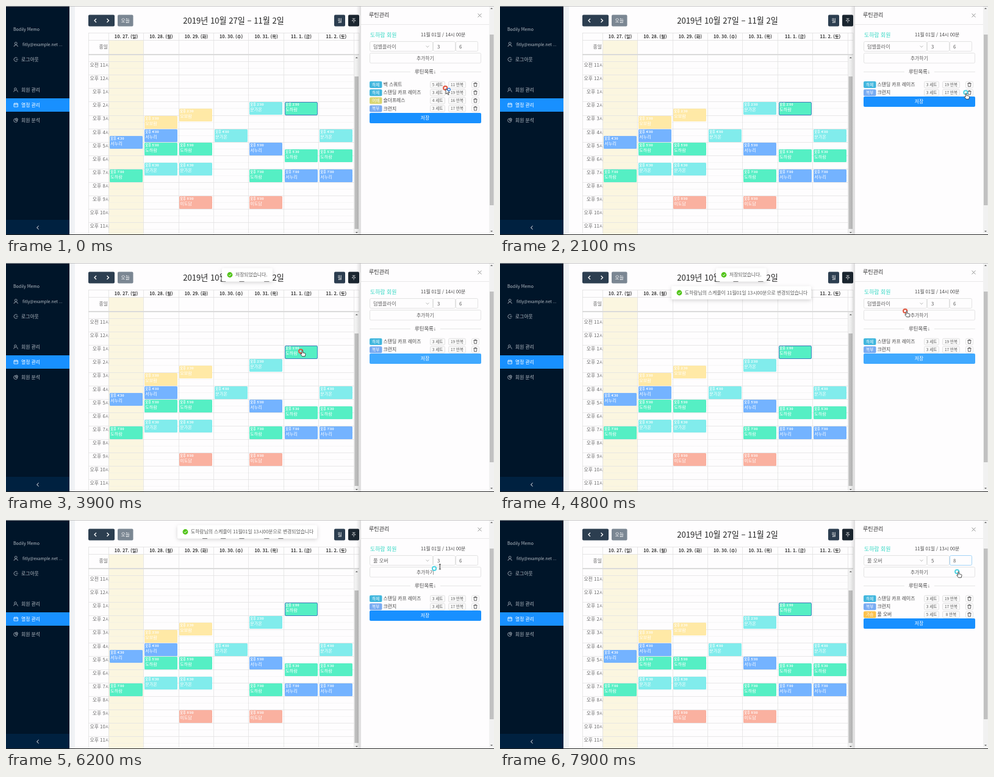
An HTML page for the animation above (8 s loop, 800 by 377 pixels).

```html
<!DOCTYPE html>
<html lang="ko">
<head>
<meta charset="utf-8">
<title>루틴관리</title>
<style>
  html, body { margin: 0; width: 100%; height: 100%; overflow: hidden; background: #fff; }
  svg { display: block; width: 800px; height: 377px; }
  text { font-family: "Noto Sans CJK KR", "Noto Sans CJK", "Noto Sans", sans-serif; white-space: pre; }
  .latin { font-family: "Liberation Sans", sans-serif; }
</style>
</head>
<body>
<svg viewBox="0 0 800 377" xmlns="http://www.w3.org/2000/svg">
  <defs>
    <filter id="soft" x="-20%" y="-40%" width="140%" height="200%">
      <feDropShadow dx="0" dy="2" stdDeviation="3" flood-opacity=".17"/>
    </filter>
    <linearGradient id="edge">
      <stop offset="0" stop-color="#000" stop-opacity="0"/>
      <stop offset="1" stop-color="#000" stop-opacity=".13"/>
    </linearGradient>
  </defs>
  <g id="base"></g><g id="drag"></g><g id="panel"></g><g id="toasts"></g><g id="pointer"></g>
</svg>
<script>
const LOOP = 8000, BODY = 7.84;
const MEMBER = '도하람', GREEN = '#55efc4', BLUE = '#74b3ff', CYAN = '#81ecec', YELLOW = '#ffe9a6', SALMON = '#fab1a0';
const PRIMARY = '#1890ff', HOVER = '#40a9ff', BORDER = '#dcdcdc', INK = '#595959', PAPER = '#fefdfe';

// Drawing helpers; text is placed by its vertical centre.
const rect = (x, y, w, h, fill, more = '') => `<rect x="${x}" y="${y}" width="${w}" height="${h}" fill="${fill}" ${more}/>`;
const box = (x, y, w, h, stroke = BORDER, fill = PAPER, r = 2) =>
  rect(x + .5, y + .5, w - 1, h - 1, fill, `stroke="${stroke}" stroke-width=".8" rx="${r}"`);
const line = (d, stroke, w = 1, more = '') => `<path d="${d}" fill="none" stroke="${stroke}" stroke-width="${w}" ${more}/>`;
const text = (x, y, s, size = BODY, fill = INK, more = '') =>
  `<text x="${x}" y="${y + size * .37}" font-size="${size}" fill="${fill}" ${more}>${s}</text>`;
const mid = 'text-anchor="middle"', bold = 'font-weight="700"';
const tri = (x, y, up, fill = '#606060') => `<path d="M${x - 2} ${y + up}h4l-2 ${-2 * up}z" fill="${fill}"/>`;

const colX = i => 168.3 + i * 57.4;
const hourY = h => 158.4 + (h - 14) * 22.1;

function event(day, hour, name, color, picked) {
  const x = Math.floor(colX(day) + 1.8), y = Math.round(hourY(hour));
  const label = `오후 ${Math.floor(hour) - 12}:${hour % 1 ? '30' : '00'}`;
  const body = picked ? box(x, y, 54, 22, '#2468b8', color, 1.5) : rect(x, y, 54, 21, color, 'rx="1.5"');
  return body + text(x + 1.2, y + 4.4, label, 5.3, '#fff', bold) + text(x + 1.2, y + 12, name, 7.1, '#fff');
}

function sidebar() {
  const soft = '#b4bcc4';
  let s = rect(0, 0, 104, 377, '#001529') + rect(0, 352, 104, 25, '#002140') + rect(0, 152, 104, 22, PRIMARY);
  s += text(12, 38, 'Bodily Memo', 7, soft) + text(27, 63, 'fitly@example.net ...', 6.8, soft);
  s += text(25, 88, '로그아웃', BODY, soft) + text(25, 138, '회원 관리', BODY, soft);
  s += text(25, 163, '열정 관리', BODY, '#fff') + text(25, 188, '회원 분석', BODY, soft);
  s += line('M14.3 61.5a1.9 1.9 0 1 1 3.8 0a1.9 1.9 0 1 1 -3.8 0M13 67q.3-3 3.2-3t3.2 3', soft, .8);
  s += line('M18.6 85.6a3.3 3.3 0 1 0 0 4.8M16 88h4', soft, .8);
  s += line('M13.6 136.6a1.8 1.8 0 1 1 3.6 0a1.8 1.8 0 1 1 -3.6 0M12.6 141.4q.2-2.6 2.6-2.6M16.6 139.2a1.2 1.2 0 1 1 2 1.4l1.2 1', soft, .8);
  s += line('M13 160.5h6.4v5.5h-6.4zM13 162.4h6.4M14.8 159.2v1.6M17.6 159.2v1.6', '#fff', .8);
  s += line('M15.6 185.2a3.1 3.1 0 1 0 3.3 3.3h-3.3zM17 184.5a3 3 0 0 1 2.5 2.6h-2.5z', soft, .8);
  return s + line('M53.6 362l-3 2.9 3 2.9', '#fff', 1);
}

function calendar() {
  const days = ['10. 27. (일)', '10. 28. (월)', '10. 29. (화)', '10. 30. (수)', '10. 31. (목)', '11. 1. (금)', '11. 2. (토)'];
  let s = rect(104, 0, 9, 377, '#f0f2f5') + rect(113, 0, 469, 377, PAPER);
  s += rect(135, 14.5, 43, 19, '#2c3e50', 'rx="2"') + rect(183, 14.5, 25.5, 19, '#7b8793', 'rx="2"');
  s += line('M148 21l-3 3 3 3M165.5 21l3 3-3 3', '#fff', 1.3);
  s += text(195.7, 24, '오늘', BODY, '#fff', mid) + text(373, 24.3, '2019년 10월 27일 – 11월 2일', 13.1, '#222', mid + ' font-weight="500"');
  s += rect(538, 14.5, 18, 19, '#2c3e50', 'rx="2"') + rect(561, 14.5, 18, 19, '#1a252f', 'rx="2"');
  s += text(547, 24, '월', BODY, '#fff', mid) + text(570, 24, '주', BODY, '#fff', mid);
  s += rect(168, 56, 57.5, 320, '#fbf6e0');
  for (let h = 11; h < 24; h++) {
    const y = Math.round(hourY(h)) - .5;
    s += line(`M135 ${y}H571`, '#e3e3e3', .8) + line(`M168 ${y + 11}H571`, '#e8e8e8', .7, 'stroke-dasharray="1 1"');
    s += text(170, hourY(h) + 5, `${h < 12 ? '오전' : '오후'} ${h > 12 ? h - 12 : h}시`, BODY, '#666', 'text-anchor="end"');
  }
  for (let i = 0; i < 8; i++) s += line(`M${Math.floor(colX(i)) + .5} 44V376`, '#e2e2e2', .8);
  s += line('M135 44.5H579V376M135.5 44V376M135 56.5H579', '#e0e0e0', .8);
  days.forEach((d, i) => s += text(colX(i) + 28.7, 50.5, d, 7.3, '#333', mid + ' ' + bold));
  s += text(167, 67.5, '종일', BODY, '#666', 'text-anchor="end"') + rect(135, 79, 444, 2, '#dadada');
  s += rect(571, 81, 8, 295, '#f1f1f1') + rect(571.5, 116, 6.5, 251, '#bdbdbd') + tri(574.8, 85, 1) + tri(574.8, 373, -1);

  const guests = { a: [MEMBER, GREEN], b: ['서누리', BLUE], c: ['문가온', CYAN], d: ['이도담', SALMON], e: ['오보람', YELLOW] };
  const plan = ['b16.5 a19', 'e15 b16 a17 c18.5', 'e14.5 a17 c18.5 d21', 'c16', 'c14 b17 a19 d21', 'a17.5 b19', 'c16 a17.5 b19'];
  plan.forEach((list, day) => list.split(' ').forEach(p => s += event(day, +p.slice(1), ...guests[p[0]])));
  return s;
}

function frame() {
  let s = rect(574, 0, 8, 377, 'url(#edge)') + rect(582, 0, 210, 377, PAPER) + rect(792, 0, 8, 377, '#f1f1f1');
  s += rect(793, 47, 6.5, 281, '#c1c1c1') + tri(796, 4, 1) + tri(796, 371, -1);
  s += text(595, 14.5, '루틴관리', 9.1, '#333') + line('M773.5 12.5l6 6M779.5 12.5l-6 6', '#888', .9);
  s += line('M582 30.5H792', '#e8e8e8') + line('M596 108.5H663M712 108.5H779', '#e4e4e4', .9);
  return s + text(687.5, 108, '루틴목록<tspan class="latin">↓</tspan>', 8.4, '#444', mid);
}

const TAGS = { 하체: '#42b7de', 어깨: '#dad673', 복부: '#78abf2', 가슴: '#fdc24c' };
const ROWS = [
  { tag: '하체', name: '백 스쿼트', sets: 5, reps: 11, from: 0, to: 1050 },
  { tag: '하체', name: '스탠딩 카프 레이즈', sets: 3, reps: 19, from: 0, to: LOOP },
  { tag: '어깨', name: '숄더프레스', sets: 4, reps: 16, from: 0, to: 1700 },
  { tag: '복부', name: '크런지', sets: 3, reps: 17, from: 0, to: LOOP },
  { tag: '가슴', name: '풀 오버', sets: 5, reps: 8, from: 7800, to: LOOP }
];

function routine(r, y) {
  const badge = (x, w, s) => box(x, y - 5.8, w, 11.6, BORDER, '#fafafa') + text(x + w / 2, y, s, 6.5, INK, mid);
  return rect(596, y - 5.5, 20.5, 11, TAGS[r.tag], 'rx="2"') + text(606.2, y, r.tag, 6.5, '#fff', mid) +
    text(618.5, y - .3, r.name, BODY, '#444') + badge(695, 25, r.sets + ' 세트') + badge(725, 29, r.reps + ' 반복') +
    box(763, y - 5.8, 13, 11.6) +
    line(`M766.4 ${y - 2.1}h6.2M768.2 ${y - 2.1}v-1.2h2.6v1.2M767.2 ${y - 2}l.3 5h4l.3-5`, '#444', .8);
}

function menu(hover) {
  const items = ['벤치프레스', '덤벨플라이', '케이블 크로스오버', '풀 오버', '딥스', '팩 덱 플라이', '시티드 체스트 프레스'];
  let s = rect(596, 77, 104, 131, '#fff', 'rx="2" filter="url(#soft)"') + text(601.5, 85, '가슴', 6.7, '#999');
  items.forEach((name, i) => {
    const y = 102 + i * 16.5;
    if (i === hover) s += rect(596, y - 8.2, 95, 16.4, '#eaf6fe');
    s += text(606, y, name, BODY, '#555', i === 1 ? bold : '');
  });
  return s + rect(691, 77, 8.5, 131, '#f1f1f1') + rect(692, 86, 6.5, 17, '#bdbdbd') + tri(695.3, 81, 1) + tri(695.3, 203, -1);
}

const between = (t, a, b) => t >= a && t < b;

function panel(t) {
  const open = between(t, 5000, 5800), sets = t < 6600 ? 3 : 5, reps = t < 7250 ? 6 : 8;
  const first = between(t, 6350, 7100), second = t >= 6900;
  let s = text(597, 47.3, MEMBER + ' 회원', 8.9, '#35d8c4') + text(680, 47, `11월 01일 / ${t < 4950 ? 14 : 13}시 00분`, 7.6, '#444');
  s += box(596, 58, 104, 17, open ? HOVER : BORDER) + text(602, 66.5, t < 5800 ? '덤벨플라이' : '풀 오버', 8.2, '#666');
  s += line(open ? 'M688.5 68l2.5-2.5 2.5 2.5' : 'M688.5 65.5l2.5 2.5 2.5-2.5', '#aaa', .8);
  s += box(700, 58, 37, 17, first ? HOVER : BORDER) + box(737, 58, 37, 17, second ? (t < 7600 ? HOVER : '#8cc9f5') : BORDER);
  s += text(707, 66.7, sets, BODY) + text(743, 66.7, reps, BODY);
  const spin = x => line(`M${x - 1.5} 65l1.5-1.5 1.5 1.5M${x - 1.5} 69l1.5 1.5 1.5-1.5`, '#aaa', .7);
  if (first) s += spin(731);
  if (between(t, 6800, 7600)) s += spin(768);
  if (between(t, 6900, 7500)) s += line('M748.3 62.5v8.5', '#333', .8);
  if (between(t, 6400, 6800)) s += line('M712.3 62.5v8.5', '#333', .8);
  s += box(596, 77, 183, 17.5) + text(687.3, 85.8, '추가하기', BODY, INK, mid);
  const rows = ROWS.filter(r => between(t, r.from, r.to));
  rows.forEach((r, i) => s += routine(r, 129.6 + i * 13.1));
  const y = Math.round(122.8 + rows.length * 13.2);
  s += rect(596, y, 183, 17, between(t, 2350, 5000) ? HOVER : PRIMARY, 'rx="2"') + text(687, y + 8.2, '저장', BODY, '#fff', mid);
  return open ? s + menu(t < 5620 ? 1 : 3) : s;
}

// Each toast slides in, stays about three seconds and leaves upwards.
const clamp = v => Math.max(0, Math.min(1, v));
const out = v => 1 - (1 - clamp(v)) ** 2;
const NOTES = [
  { x: 354, w: 83, from: 2600, to: 5750, s: '저장되었습니다.', y: () => 19.5 },
  { x: 281, w: 229, from: 4250, to: 7400, s: MEMBER + '님의 스케줄이 11월01일 13시00분으로 변경되었습니다', y: t => 49 - 29.5 * out((t - 5800) / 300) }
];
const toast = (n, t) => {
  if (!between(t, n.from, n.to + 300)) return '';
  const p = Math.min(out((t - n.from) / 300), 1 - clamp((t - n.to) / 300)), y = n.y(t) - (1 - p) * 22;
  return `<g opacity="${p}">` + rect(n.x, y - 10.7, n.w, 21.4, '#fff', 'rx="2" filter="url(#soft)"') +
    `<circle cx="${n.x + 13}" cy="${y}" r="4.4" fill="#52c41a"/>` +
    line(`M${n.x + 11} ${y}l1.5 1.7 2.6-3.2`, '#fff', 1) + text(n.x + 22, y, n.s, 7.8, INK) + '</g>';
};

const PATH = [
  [0, 723, 138], [150, 723, 138], [750, 769, 132], [1200, 769, 133.5], [1450, 769, 143], [2000, 768, 144],
  [2400, 746, 160], [2900, 746, 160], [3400, 486, 168], [3550, 486, 168], [3950, 486, 146], [4200, 486, 146],
  [4750, 667, 82], [4850, 667, 82], [4960, 664, 72], [5100, 664, 72], [5500, 646, 127], [5700, 636, 151],
  [5850, 636, 151], [6300, 722, 66], [6650, 722, 66], [6900, 761, 62], [7300, 761, 62], [7650, 752, 88], [LOOP, 752, 88]
];
function spot(t) {
  t = Math.max(0, t);
  const i = PATH.findIndex(p => p[0] > t), [a, x, y] = PATH[i - 1], [b, u, v] = PATH[i];
  const p = (t - a) / (b - a), e = p * p * (3 - 2 * p);
  return [x + (u - x) * e, y + (v - y) * e];
}
const step = (table, t) => table.filter(r => r[0] <= t).pop()[1];

// Ring colour: red while a button is pressed, teal otherwise.
const PRESSES = [[0, 300], [950, 1100], [1620, 1780], [3500, 4000], [4700, 5050], [5740, 5850], [6330, 6450], [7720, 7840]];
const ring = t => between(t, 2450, 2900) ? '#8a4a44' : PRESSES.some(p => between(t, ...p)) ? '#e2553f' : '#4fd3e2';
const SHAPE = [[0, 'busy'], [500, 'hand'], [2930, 'arrow'], [3330, 'hand'], [4200, 'arrow'], [4650, 'hand'],
  [5880, 'arrow'], [6180, 'beam'], [7480, 'hand']];
const ARROW = '<path d="M-2-2v9l2.1-2 1.5 3.2 1.5-.7-1.5-3.1h2.8z" fill="#fff" stroke="#222" stroke-width=".8"/>';
const CURSOR = {
  arrow: ARROW,
  busy: ARROW + '<circle cx="3" cy="-.5" r="2.2" fill="#fff" stroke="#2c7be0" stroke-width="1.3"/>',
  hand: '<path d="M-1.2-2.4q1-1 1.7 0v3.2l3.4.7q1.3.5 1.1 1.8l-.8 3.5h-4.6l-2.8-3.6q0-1.2 1-.9l1 .8z" fill="#fff" stroke="#222" stroke-width=".8"/>',
  beam: '<path d="M-1.6-3.6h3.2M0-3.6v8M-1.6 4.4h3.2" fill="none" stroke="#222" stroke-width=".9"/>'
};
function pointer(t) {
  const [x, y] = spot(t), [u, v] = spot(t - 30);
  return `<circle cx="${u - 2.8}" cy="${v - 3}" r="3.1" fill="#fff" fill-opacity=".4" stroke="${ring(t)}" stroke-width="2"/>` +
    `<g transform="translate(${x} ${y})">${CURSOR[step(SHAPE, t)]}</g>`;
}

const shown = {};
function put(id, markup) {
  if (shown[id] === markup) return;
  document.getElementById(id).innerHTML = shown[id] = markup;
}
function draw(t) {
  put('drag', event(5, step([[0, 14], [3700, 13.5], [3850, 13]], t), MEMBER, GREEN, true));
  put('panel', panel(t));
  put('toasts', NOTES.map(n => toast(n, t)).join(''));
  put('pointer', pointer(t));
}

put('base', sidebar() + calendar() + frame() + rect(0, 0, 800, .8, '#bbb') + rect(0, 376, 800, 1, '#222'));
const start = performance.now();
(function tick() {
  draw((performance.now() - start) % LOOP);
  requestAnimationFrame(tick);
})();
</script>
</body>
</html>
```
